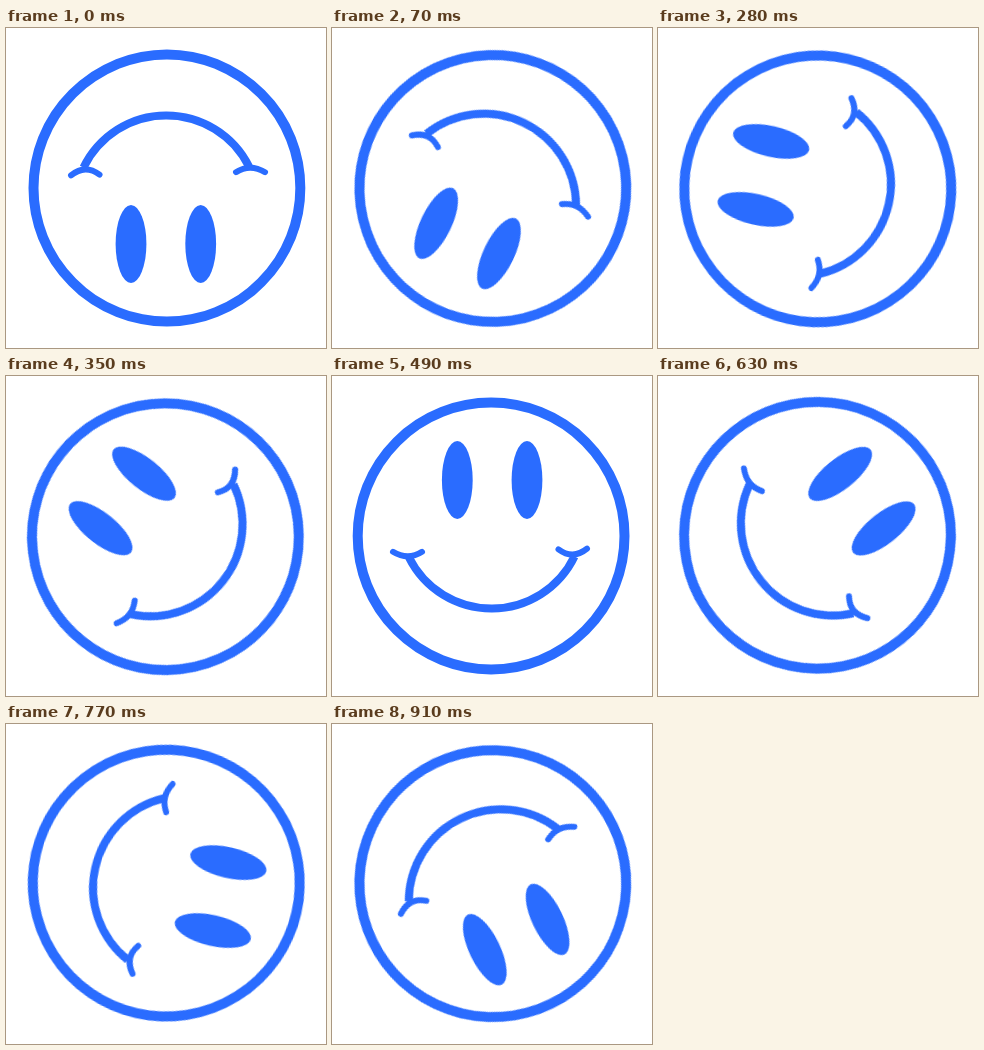
An HTML page that plays this animation: 320 by 320 pixels, repeating every 980 ms.

```html
<!DOCTYPE html>
<html lang="en">
<head>
<meta charset="utf-8">
<title>Rolling smiley</title>
<style>
  html, body { margin: 0; width: 100%; height: 100%; overflow: hidden; background: #fff; }
  svg { display: block; width: 100%; height: 100%; }
  .face {
    fill: none;
    stroke: #2a6cff;
    stroke-linecap: round;
    transform-origin: 160px 160px;
    animation: roll 980ms steps(14) infinite;
  }
  .eye { fill: #2a6cff; stroke: none; }
  @keyframes roll {
    from { transform: rotate(180deg); }
    to { transform: rotate(540deg); }
  }
</style>
</head>
<body>
<svg viewBox="0 0 320 320">
  <g class="face">
    <circle cx="159.1" cy="160" r="133.4" stroke-width="10"/>
    <ellipse class="eye" cx="125.3" cy="104" rx="15.4" ry="39"/>
    <ellipse class="eye" cx="195" cy="104" rx="15.4" ry="39"/>
    <path d="M77 181.5A92.2 92.2 0 0 0 242.5 180.5" stroke-width="8" stroke-linecap="butt"/>
    <path d="M61 175.8Q76 185 90 175.8M226.5 173.3Q241 184 255 172.6" stroke-width="6"/>
  </g>
</svg>
</body>
</html>
```
